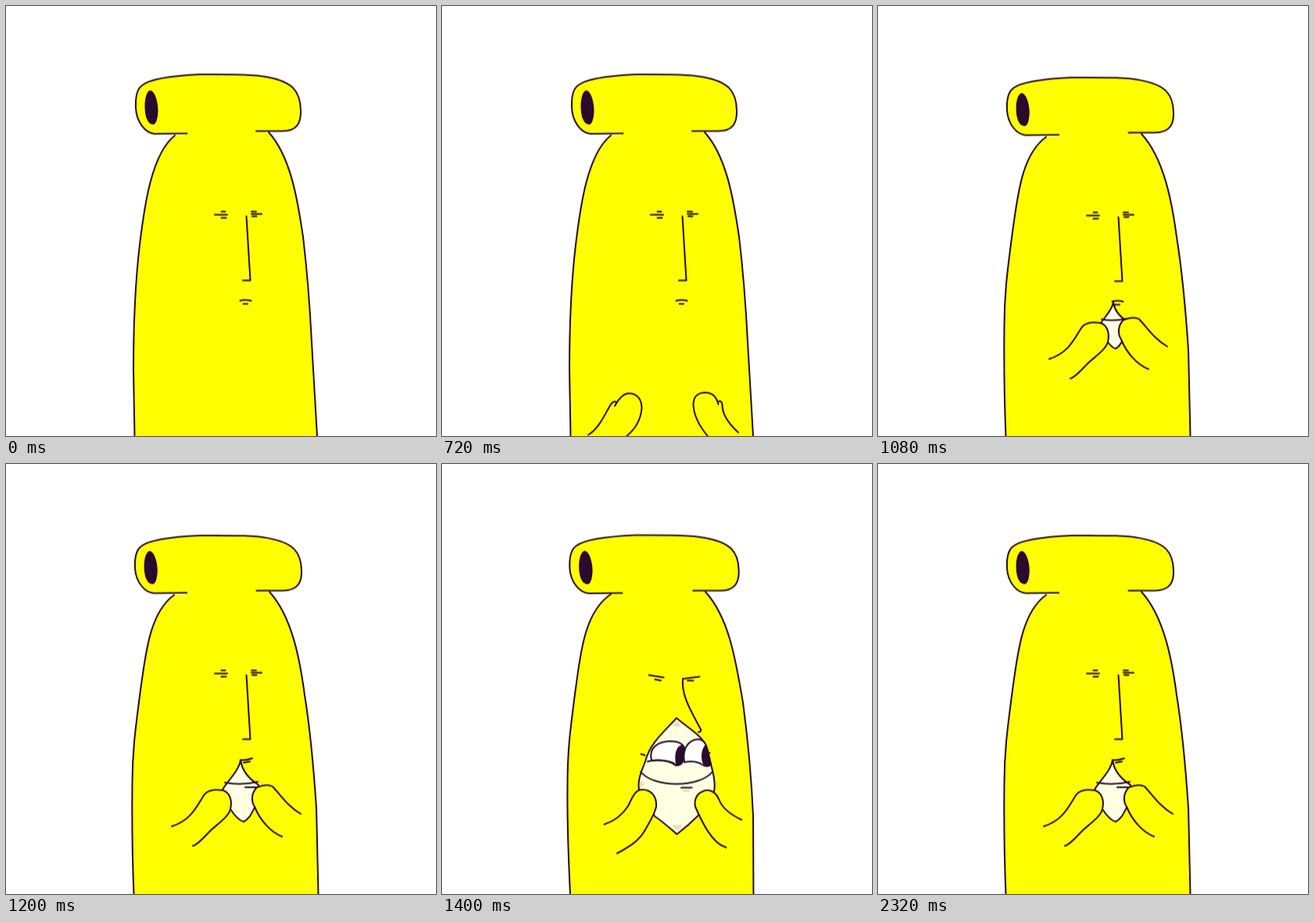
An HTML page that plays this animation: 550x550 px, repeating every 2440 ms.

```html
<!DOCTYPE html>
<html lang="en">
<head>
<meta charset="utf-8">
<title>Yellow fellow</title>
<style>
html, body { margin: 0; width: 100%; height: 100%; overflow: hidden; background: #fff; }
svg { display: block; width: 100vw; height: 100vh; overflow: hidden; }
path { vector-effect: non-scaling-stroke; }
.ink { fill: none; stroke: #240a26; stroke-width: 2; stroke-linecap: round; stroke-linejoin: round; }
.skin { fill: #ff0; }
.cream { fill: #ffffe2; }
.white { fill: #fff; }
.dark { fill: #2a0b2d; }
.shade { fill: #e9dfc4; stroke: none; }

/* The poses stand side by side, 550 apart; the strip jumps between them. */
#strip { animation: poses 2440ms step-end infinite; }
@keyframes poses {
  0% { transform: translateX(0); }
  26.229% { transform: translateX(-550px); }
  29.508% { transform: translateX(-1100px); }
  32.786% { transform: translateX(-1650px); }
  37.704% { transform: translateX(-2200px); }
  44.262% { transform: translateX(-2750px); }
  49.180% { transform: translateX(-3300px); }
  54.098% { transform: translateX(-3850px); }
  57.377% { transform: translateX(-4400px); }
  91.803% { transform: translateX(-3850px); }
  95.081% { transform: translateX(-3300px); }
  100% { transform: translateX(0); }
}
</style>
</head>
<body>
<svg viewBox="0 -0.5 550 550">
<defs>
  <g id="hat">
    <path class="skin" stroke="none" d="M230 150H325V170H230Z"/>
    <path class="skin" d="M320 159.500L352 159.500C373 160 377.500 148 377 133C376.500 108 366 96.500 335 90.500C315 86.500 290 87 248 87C215 88.500 185 92 174 101C167 106 165.500 118 166 130C167 148 178 162 190 163L231.500 162.500"/>
    <path class="dark" stroke="none" d="M184 107.500C190 106.500 194.500 122 194.500 132C194.500 143 192 151.500 188 151C180 150.500 177.500 138 177.500 127C177.500 118 180 108.500 184 107.500Z"/>
  </g>

  <path id="bodyRest" class="skin" d="M216 165C186 189 177 255 171 305C165 355 163 420 163 465L164.500 550V570H399L398 550L391 430C389 390 386 345 380 295C373 247 364 192 336 161"/>
  <path id="bodyHold" class="skin" d="M215 167C183 190 178.500 245 172.500 285C166 335 161.500 365 161.500 410C161 460 161 490 163.500 550V570H399.500V550L397 440C394 395 390 345 382 295C376 250 366 195 337 163"/>

  <path id="eyes" d="M267 266.500H283M275.500 262.500H280.500M275.500 270.500H281.500M314 262.500H320M314 265.500H327M315 268.500H320.500"/>
  <path id="nose" d="M307.500 268.500L312.500 350.500H303"/>
  <path id="mouth" d="M299.500 376.500Q306 374.500 313.500 376.500M303.500 380.500H309"/>
  <g id="face"><use href="#eyes"/><use href="#nose"/><use href="#mouth"/></g>

  <g id="raised" class="skin">
    <path d="M187 520C201 512 209 492 216 481Q219 476 224 478M221 483C226 474 232 467 239 467C250 467 255.500 475 255.500 486C254 505 243 517 232 525C225 530 220 537 213 541"/>
    <path d="M345 528C333 514 323 500 321.500 483C321 470 328 466 337 466C348 466 352 475 353.500 481M353 478Q357 475 358.500 481C358 494 367 506 379 517"/>
  </g>

  <path id="handL" class="skin" d="M212 463C238 455 245 435 254 422C260 415 270 416 278 417C288 421 289 432 287 441C284 452 270 460 261 469C253 477 246 486 239 488"/>
  <path id="handR" class="skin" d="M377 447C361 438 352 424 341 412C334 408 326 411 321 413C314 420 313 430 318 438C325 455 338 470 353 476"/>

  <g id="nib">
    <path class="cream" d="M300 378C298 392 284 404 277 416L287 441C293 450 299 456 304 457C312 453 314 446 319 437L323 410C312 403 302 393 300 378Z"/>
    <path d="M280 407Q300 411 322 406"/>
  </g>
</defs>

<g id="strip" class="ink">
  <!-- rest -->
  <g>
    <use href="#bodyRest"/><use href="#hat"/><use href="#face"/>
  </g>

  <!-- fingertips appear -->
  <g transform="translate(550)">
    <path class="skin" d="M216 165C186 189 177 255 171 305C165 355 163 410 163 465C162 495 161 520 162 550V570H399V550C398 525 398 505 395 490L391 430C389 390 386 345 380 295C373 247 364 192 336 161"/>
    <use href="#hat"/><use href="#face"/>
    <path class="skin" d="M166 552C172 540 180 536 190 536C204 537 208 543 207 554"/>
    <path class="skin" d="M347 552C348 537 356 532 366 533C377 533 384 542 390 554"/>
  </g>

  <!-- hands rise -->
  <g transform="translate(1100)">
    <use href="#bodyRest"/><use href="#hat"/><use href="#face"/>
    <use href="#raised" y="28"/>
  </g>
  <g transform="translate(1650)">
    <path class="skin" d="M216 165C186 189 177 255 171 305L166.500 348C165 370 164 400 163.500 425C164 440 165 450 164.500 465L164.500 570H399L398 550L391 430C389 390 386 345 380 295C373 247 364 192 336 161"/>
    <use href="#hat"/><use href="#face"/><use href="#raised"/>
  </g>

  <!-- hands meet below the mouth -->
  <g transform="translate(2200)">
    <use href="#bodyRest"/>
    <use href="#hat" transform="matrix(1.003 0 0 .99 -.8 1.600)"/>
    <use href="#face"/>
    <use href="#handL" x="10" y="-16"/><use href="#handR" x="-9" y="-16"/>
  </g>
  <g transform="translate(2750)">
    <use href="#bodyHold"/>
    <use href="#hat" transform="matrix(1.0095 0 0 .972 -2.58 6.400)"/>
    <use href="#face" y="1"/>
    <use href="#nib" transform="matrix(.75 0 0 .75 76 95)"/>
    <use href="#handL" x="7" y="-12"/><use href="#handR" x="-7" y="-12"/>
  </g>

  <!-- the tip is drawn out -->
  <g transform="translate(3300)">
    <use href="#bodyHold"/>
    <use href="#hat" transform="matrix(1.0095 0 0 .972 -2.58 6.400)"/>
    <use href="#eyes" y="1"/><use href="#nose" y="1"/>
    <path d="M300 378.500Q308 378.500 315 376M304 381.500L312 380"/>
    <use href="#nib"/>
    <use href="#handL"/><use href="#handR"/>
    <path d="M306 413H321"/>
  </g>

  <!-- half-way -->
  <g transform="translate(3850)">
    <path class="skin" d="M215 167C183 190 178 245 171.500 285C165 335 161 365 160.500 410C159.500 460 159.500 490 162.500 550V570H400V450C399 425 394 375 390 345C382 280 370 200 337 164"/>
    <use href="#hat" transform="matrix(1.0166 0 0 .962 -4.51 8.600)"/>
    <path d="M266 268.500L283 270.500M273 272.500L281 273.500M310 270.500L327.500 268M313.500 273.500H321"/>
    <path d="M308 270.500L316 350Q315.500 352.500 307 352"/>
    <path d="M318.500 378.500L325 378M317 381L323 381.500"/>
    <path class="cream" d="M300 371.500L281 385C270 393 265 405 263 416L280 449C287 452 295 458 303 462C310 459 317 453 325 446L339 417C340 413 340 409 337 402C331 386 316 377 300 371.500Z"/>
    <path class="shade" d="M292 454L303 460L312 454Q303 457 292 454ZM306 416H320L317 419H307Z"/>
    <path d="M266 403C285 410.500 320 410.500 338 403"/>
    <path d="M306 413.500H320"/>
    <path class="skin" d="M212.500 459C232 451 243 436 254 421C261 414 271 415 275 421C281 430 283 440 277 451C271 460 257 475 233.500 489.500"/>
    <path class="skin" d="M379 449.500C360 443 352 425 341 419C332 414 325 417 322 423C318 431 320 438 323 447C330 460 338 472 349 480.500"/>
  </g>

  <!-- the little one looks back -->
  <g transform="translate(4400)">
    <path class="skin" d="M216 166C180 190 176.500 250 170.500 290C164 340 160.500 365 160.500 410C160 460 161 490 164 550V570H398.500L398 450C396 405 391 350 385 305C375 245 366 195 337 163"/>
    <use href="#hat" transform="matrix(1.025 0 0 .98 -6.79 5.300)"/>
    <path d="M264.500 269.500L283.500 272.500M272.500 275L280 276.500M310 274L329.500 271.500M314 276.500H321.500"/>
    <path d="M308 274C306 295 318 315 330 337C332.500 341 331 342 328 342.500"/>
    <path d="M254.500 370.500L259.500 372M338 369.500L342.500 369"/>
    <path class="cream" d="M300 324.500C285 341 266 356 260 380C254 395 250 405 252 416L272 450C281 456 290 464 300.500 473C311 465 320 457 330 447L348 418C351 405 344 385 341 372C339 349 318 340 300 324.500Z"/>
    <path class="shade" d="M294 334L300 328L306 334L303 336ZM294 461H308L301 469ZM253 403L259 409L253 415ZM307 416H319L316 419H309Z"/>
    <path class="white" d="M268 379C264 362 276 355 291 354C303 354 310 358 311 366C312 378 306 385 299 385C291 379 278 378 268 379Z"/>
    <path class="dark" stroke="none" d="M306 359C313 362 311 378 305 384Q301 387 299 383C297 373 299 361 306 359Z"/>
    <path d="M263 380C273 377 288 378 296 382Q301 388 307 382"/>
    <path class="white" d="M310 381C307 364 315 352 328 351.500Q335 352 338 360Q342 374 344 384Q338 388 333 384Q323 378 310 381Z"/>
    <path class="dark" stroke="none" d="M338 358C331 363 330 378 335 385Q340 388 344 385Q341 370 338 358Z"/>
    <path d="M254 393C270 414 330 414 346 393M306 413.500H319.500"/>
    <path class="skin" d="M207.500 460.500C221 456 231 448 238 437C244 425 247 416 256 416C268 416 275 425 274 438C271 450 264 460 259 469C251 483 236 491 224 497.500"/>
    <path class="skin" d="M383 454.500C367 447 358 439 354 428C349 417 340 415 334 418C326 421 322 429 324 438C332 456 345 485 363.500 490"/>
  </g>
</g>
</svg>
</body>
</html>
```
